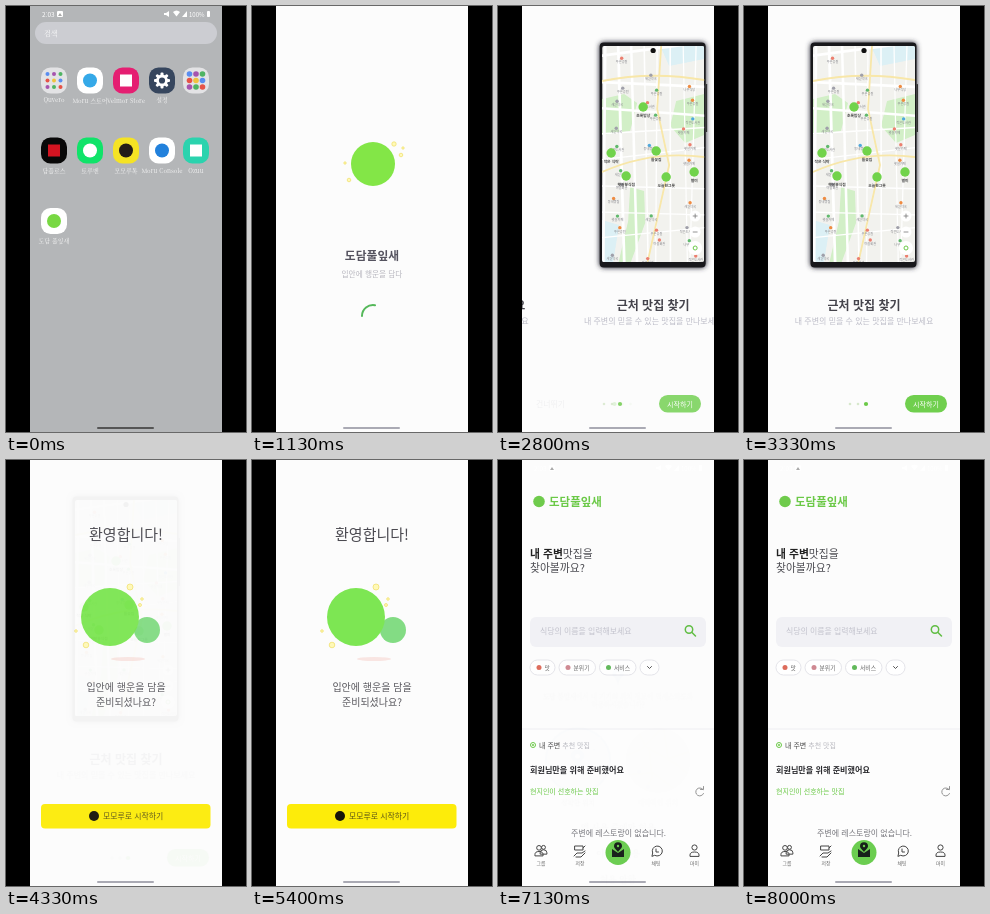
These frames come from a looping animation (240 by 426 pixels, 8070 ms). An HTML page:

```html
<!DOCTYPE html>
<html lang="ko">
<head>
<meta charset="utf-8">
<style>
  html, body { margin: 0; width: 100%; height: 100%; overflow: hidden; background: #000; }
  svg { display: block; width: 100vw; height: 100vh; }
  text { font-family: "Noto Sans CJK KR", "Noto Sans CJK", "Noto Sans", sans-serif; }
  .serif { font-family: "Noto Serif CJK KR", "Noto Serif", "Noto Sans CJK KR", serif; }
</style>
</head>
<body>
<svg id="stage" viewBox="0 0 240 426" xmlns="http://www.w3.org/2000/svg"></svg>
<script>
const LOOP = 8070;
const GREEN = '#6bc947', BLUE = '#1a6fd4', PAPER = '#fcfcfc';

// Drawing helpers
const text = (x, y, size, fill, str, { anchor = 'start', weight = 400, cls = '' } = {}) =>
  `<text x="${x}" y="${y}" font-size="${size}" fill="${fill}" text-anchor="${anchor}" font-weight="${weight}" class="${cls}">${str}</text>`;
const mid = (x, y, size, fill, str, weight = 400, cls = '') =>
  text(x, y, size, fill, str, { anchor: 'middle', weight, cls });
const rect = (x, y, w, h, fill, r = 0, extra = '') =>
  `<rect x="${x}" y="${y}" width="${w}" height="${h}" rx="${r}" fill="${fill}" ${extra}/>`;
const dot = (x, y, r, fill, extra = '') => `<circle cx="${x}" cy="${y}" r="${r}" fill="${fill}" ${extra}/>`;
const line = (d, stroke, width = 1, extra = '') =>
  `<path d="${d}" fill="none" stroke="${stroke}" stroke-width="${width}" stroke-linecap="round" stroke-linejoin="round" ${extra}/>`;
const shape = (d, fill) => `<path d="${d}" fill="${fill}"/>`;
const group = (id, body, extra = '') => `<g id="${id}" ${extra}>${body}</g>`;
const page = fill => rect(24, 0, 192, 426, fill);
const gesture = color => rect(91, 421, 57, 2, color, 1);
const pin = (x, y, s, hole = '#fff') => `<g transform="translate(${x} ${y}) scale(${s})">` +
  shape('M0 8C-2-0.5-6 0-6-3A6 6 0 0 1 6-3C6 0 2-0.5 0 8Z', BLUE) + dot(0, -3, 2.2, hole) + '</g>';
const sparkles = points => points.map(([x, y, r]) =>
  dot(x, y, r, '#fff9b8', 'stroke="#f0df64" stroke-width=".7"')).join('');

function seeded(seed) {
  return () => (seed = (seed * 16807) % 2147483647) / 2147483647;
}

function statusBar() {
  return text(36, 10.5, 6.5, '#fff', '2:03') +
    rect(51, 5, 6, 6, '#fff', 1) + shape('M52 10l2-3 2 3z', '#aaa') +
    shape('M158 7h2l3-2v6l-3-2h-2z', '#fff') +
    shape('M167 6q3.500-3 7 0l-3.500 4.500z', '#fff') + shape('M176 11l5-6v6z', '#fff') +
    text(183, 10.500, 6, '#fff', '100%') + rect(201, 5, 3, 6, '#fff', .8);
}

function homeScreen() {
  const cols = [48, 84, 120, 156, 190];
  const tile = (x, y, fill) => rect(x - 13, y - 13, 26, 26, fill, 9.500);
  const label = (x, y, str) => mid(x, y + 22, 6, '#f6f6f6', str, 400, 'serif');
  const colors = ['#e65347', '#5a8df0', '#4fb463', '#f0c23f', '#a654ae'];
  const folder = (x, y, r) => tile(x, y, '#e3e3e5') + Array.from({ length: 9 }, (_, i) =>
    dot(x - 6.5 + (i % 3) * 6.5, y - 6.5 + Math.floor(i / 3) * 6.5, r, colors[(i * 3 + 1) % 5])).join('');
  const app = (col, y, fill, mark, name, square) => {
    const x = cols[col];
    return tile(x, y, fill) + (square ? rect(x - 6, y - 6, 12, 12, mark) : dot(x, y, 7, mark)) + label(x, y, name);
  };
  const gear = Array.from({ length: 8 }, (_, i) =>
    rect(154.5, 66.5, 3, 4, '#fff', 1, `transform="rotate(${i * 45} 156 74.5)"`)).join('') +
    dot(156, 74.5, 4.5, 'none', 'stroke="#fff" stroke-width="2.800"');
  return page('#b4b6b8') + statusBar() + rect(29, 16, 182, 22, '#cccdd2', 11) +
    text(38, 29.500, 7, '#fff', '검색', { cls: 'serif' }) +
    folder(48, 74.5, 2) + label(48, 74, 'Quvero') +
    app(1, 74.5, '#fff', '#35a9e8', 'Moru 스토어') +
    app(2, 74.5, '#e51f72', '#fff', 'Velmor Store', true) +
    tile(156, 74.5, '#36465e') + gear + label(156, 74, '설정') +
    folder(190, 74.5, 2.8) +
    app(0, 144.500, '#080808', '#d41421', '담플로스', true) +
    app(1, 144.500, '#10e369', '#fff', '토루벤') +
    app(2, 144.500, '#f5e324', '#241c18', '모모루톡') +
    app(3, 144.500, '#fff', '#2281dc', 'Moru Console') +
    app(4, 144.500, '#2bd3ae', '#fff', 'Ozuu', true) +
    app(0, 215, '#fff', '#78d843', '도담 풀잎새') + gesture('#555');
}

function splashScreen() {
  return page(PAPER) + dot(121, 158, 22, '#83e647') +
    sparkles([[142, 138, 2.2], [151, 142, 1.2], [149, 149, 1.8], [93, 157, 1.2], [97, 174, 1.8]]) +
    mid(120, 254, 11.8, '#55535f', '도담풀잎새', 700) +
    mid(120, 271, 7.7, '#b8b7bf', '입안에 행운을 담다', 300) +
    group('spinner', line('M110 310A11 11 0 0 1 123 299.200', '#55b85a', 2)) + gesture('#aaaab4');
}

function phone(content) {
  return rect(66, 36, 107, 226, '#33323c', 5, 'filter="url(#shadow)"') +
    rect(66.5, 36.5, 106, 225, '#18181b', 4) + rect(172.5, 78, 1.5, 48, '#333', .5) +
    `<g clip-path="url(#glass)">${content}</g>` + dot(120, 44.5, 2.600, '#111');
}

const caption = (title, sub, subSize) =>
  mid(120, 304, 12, '#44434b', title, 700) + mid(120, 317.5, subSize, '#bdbdc8', sub, 300);

function timePicker() {
  return rect(69, 40, 102, 216, '#737374') +
    mid(120, 56, 8, '#38383c', '이게 뭐예요?', 700) + text(73, 55, 6, '#444', '‹') +
    [[86, 88], [121, 88], [151, 88]].map(([x, y]) => dot(x, y, 2, '#666')).join('') +
    rect(69, 217, 102, 18, '#777778') + text(73, 226, 4, '#555', '오늘의 식사 시간을 골라요') +
    rect(69, 236, 102, 20, '#69696b') +
    rect(72, 96, 95, 116, '#fdfdfd', 5) +
    shape('M72 138V101q0-5 5-5h85q5 0 5 5v37z', '#86c2f7') +
    shape('M99 128Q99 122 103 116Q107 111 111 116Q116 122 116 128Q115 131 107 131Q100 131 99 128Z', '#fff9e9') +
    rect(103.5, 124, 8, 7, '#28302e', 1) + dot(104, 121, .7, '#333') + dot(111, 121, .7, '#333') +
    dot(102, 123, 1, '#f3b8aa') + dot(113, 123, 1, '#f3b8aa') +
    text(109.5, 149, 4, GREEN, '오전', { weight: 700 }) + text(121.5, 149, 4, '#c8c8c8', '오후') +
    mid(119.5, 173, 16, '#96969a', `06:<tspan fill="${GREEN}">10</tspan>`, 700) +
    line('M82 183H158', '#cfeec0', 1.500, 'stroke-dasharray="1 1.800"') +
    line('M82 183H95', GREEN, 1.500) + dot(95.5, 183, 3, GREEN) +
    text(133, 204, 4, GREEN, '취소') + text(151, 204, 4, GREEN, '확인');
}

function cityMap() {
  const rnd = seeded(41);
  const names = ['나무식당', '푸른공원', '햇살카페', '작은도서관', '동네빵집', '마을회관', '새길약국'];
  const tones = ['#ef8c42', '#ec7f6f', '#50a8dc', '#a0a0aa', '#61b96d'];
  let map = rect(69, 40, 102, 216, '#f2f2ee') +
    shape('M69 93l22-5 13 9-7 28-28 4zM143 95l28-7v41l-19 8-15-17zM97 181l14 4 1 32-15 41H85l10-43z', '#d2efc7') +
    shape('M69 214l17 5-6 37H69zM127 40h44v13l-35 7z', '#dcf0f5');
  for (let i = 0; i < 9; i++) {
    const y = 50 + i * 26, x = 72 + i * 13;
    map += line(`M66 ${y}L174 ${y + (rnd() - .6) * 24}M${x} 38L${x + (rnd() - .5) * 18} 260`, '#fff', 1 + rnd() * 1.800);
  }
  map += line('M69 75Q118 65 171 74M128 40L124 103L136 159L114 258M69 166Q118 144 171 151', '#f8e7a9', 1.800);
  for (let row = 0; row < 15; row++) {
    for (let col = 0; col < 3; col++) {
      const x = 78 + col * 36 + rnd() * 13, y = 52 + row * 14 + rnd() * 5;
      if (rnd() < .2) continue;
      const tone = tones[Math.floor(rnd() * tones.length)];
      map += dot(x, y, 1.700, tone) + mid(x, y + 5, 3.200, '#85858b', names[Math.floor(rnd() * names.length)]);
    }
  }
  const spots = [[110, 101, '초록밥상'], [123, 145, '들꽃집'], [78, 147, '작은 식탁'],
    [93, 170, '햇살분식점'], [133, 171, '오늘한그릇'], [161, 166, '별미']];
  map += spots.map(([x, y, name]) => dot(x, y, 4.700, '#71d34b') + mid(x, y + 10, 3.800, '#444', name, 700)).join('');
  return map + [210, 226, 242].map((y, i) => dot(162, y, i === 2 ? 7 : 5.500, '#fff') +
    (i === 2 ? dot(162, y, 2, 'none', `stroke="${GREEN}"`) : line(i ? `M160 ${y}h4` : `M160 ${y}h4M162 ${y - 2}v4`, '#777', .8))).join('');
}

function onboarding() {
  const pager = (start, step, active) => [0, 1, 2].map(i =>
    dot(start + i * step, 398, i === active ? 2.100 : 1.300, i === active ? GREEN : '#d7e8cc')).join('');
  return page(PAPER) +
    group('slideA', phone(timePicker()) + caption('원하는 시간에 만나보세요', '여행 일정을 자유롭게 조율할 수 있어요', 8.4)) +
    group('slideB', phone(cityMap()) + caption('근처 맛집 찾기', '내 주변의 믿을 수 있는 맛집을 만나보세요', 8)) +
    group('footerA', text(38, 401, 7.9, '#b9b9c0', '건너뛰기', { weight: 300 }) + pager(116.5, 8, 0) +
      dot(192, 398, 8, '#e7f8eb') + line('M189.500 398h5m-2-2 2 2-2 2', GREEN)) +
    group('footerB', pager(106, 8, 2) + rect(161, 389, 42, 17.5, '#70cf4e', 8.700) +
      mid(182, 400.500, 7, '#fff', '시작하기', 500)) + gesture('#aaaab4');
}

function welcomeScreen() {
  return page(PAPER) + mid(120, 79.500, 15, '#4b4a51', '환영합니다!', 500) +
    '<ellipse cx="122" cy="199" rx="17" ry="2" fill="#f9e5e2"/>' +
    dot(141, 170, 13, '#83dc84') + dot(104, 157, 29, '#7de653') +
    sparkles([[124, 127, 3], [136, 139, 1.300], [134, 145, 1.500], [70, 171, 1.300], [80, 185, 2.800]]) +
    mid(120, 231, 10, '#58575d', '입안에 행운을 담을', 500) + mid(120, 246, 10, '#58575d', '준비되셨나요?', 500) +
    rect(35, 344, 169.500, 24.5, '#fdec0a', 4) + dot(88, 356, 5, '#16140a') +
    text(97, 359, 7.900, '#5a5317', '모모루로 시작하기') + gesture('#aaaab4');
}

function mainScreen() {
  const chip = (x, w, str, tone) => rect(x, 200, w, 15, '#fff', 7.500, 'stroke="#dedee4" stroke-width=".800"') +
    dot(x + 9, 207.500, 2.500, tone) + text(x + 14.500, 210, 5.800, '#666', str);
  const person = (x, y, s = 1) => dot(x, y - 3.500 * s, 2.600 * s, 'none', 'stroke="#444"') +
    line(`M${x - 4.500 * s} ${y + 5 * s}v-1q0-3 ${4.500 * s}-3t${4.500 * s} 3v1z`, '#444');
  return page(PAPER) + statusBar() + dot(41, 41.500, 5.800, '#6fcb4c') +
    text(51, 46, 11.500, GREEN, '도담풀잎새', { weight: 700 }) +
    text(32, 97.500, 10.800, '#4a4a50', '<tspan font-weight="700" fill="#222">내 주변</tspan>맛집을', { weight: 300 }) +
    text(32, 112, 10.800, '#4a4a50', '찾아볼까요?', { weight: 300 }) +
    rect(32, 157, 176, 30, '#f1f1f5', 6) +
    text(42, 173.500, 7.900, '#c3c3cd', '식당의 이름을 입력해보세요', { weight: 300 }) +
    dot(191, 169.500, 3.700, 'none', 'stroke="#60bd43" stroke-width="1.500"') + line('M194 172.500l3.500 3.500', '#60bd43', 1.500) +
    chip(32, 25, '맛', '#dd6c5c') + chip(61, 36.500, '분위기', '#cf8992') + chip(101.500, 36.500, '서비스', '#62b95b') +
    rect(142, 200, 19, 15, '#fff', 7.500, 'stroke="#dedee4" stroke-width=".800"') + line('M149.500 206.500l2 2 2-2', '#555') +
    rect(24, 269, 192, 157, '#fdfdfd') + line('M24 269H216', '#ededf1') +
    dot(35, 285, 2.500, 'none', `stroke="${GREEN}"`) + dot(35, 285, 1, GREEN) +
    text(41, 288, 7, '#b8b8bf', '<tspan fill="#444">내 주변</tspan> 추천 맛집') +
    text(32, 313, 8.100, '#29292d', '회원님만을 위해 준비했어요', { weight: 700 }) +
    text(32, 334, 7, GREEN, '현지인이 선호하는 맛집') +
    line('M205 329.500a4 4 0 1 0 .5 4M205.500 326.500v3h-3', '#888', .9) +
    text(73, 375.500, 8, '#77777d', '주변에 레스토랑이 없습니다.', { weight: 300 }) +
    person(45.5, 390, .75) + person(41, 391, .9) +
    line('M77 386h8v4h-8zM76 396l3-3h5l3-2M78 397h5l4-4M85 388l2-2', '#444') +
    dot(120, 392.500, 12.500, '#6bcd50') + shape('M114 389l6 4 6-4v8h-12z', '#17201a') +
    shape('M120 392C118 389 116 388.500 116 386A4 3.800 0 0 1 124 386C124 388.500 122 389 120 392Z', '#17201a') + dot(120, 386, 1.200, '#6bcd50') +
    line('M154 396l.7-3A5 5 0 1 1 157 395.500zM158 389v3h2.500', '#444') + person(196.500, 391) +
    [[43, '그룹'], [82, '저장'], [158, '채팅'], [196.500, '마이']].map(([x, s]) => mid(x, 405, 4.800, '#666', s)).join('') +
    gesture('#aaaab4');
}

function permissionDialog() {
  const choice = (y, str) => mid(120, y, 8.600, '#35353a', str, 700, 'serif');
  return rect(29, 167, 182, 243, '#fdfdfd', 14) + pin(120, 187, .95) +
    mid(120, 209, 6.5, '#666', '<tspan font-weight="700" fill="#444">도담 풀잎새</tspan>에서 내 기기의 위치 정보에 액세스하도록', 400, 'serif') +
    mid(120, 217, 6.5, '#666', '허용하시겠습니까?', 400, 'serif') +
    dot(80, 270.500, 32, '#d8e8fa', `stroke="${BLUE}" stroke-width="1.800"`) +
    line('M55 252l20 10 27-14M64 295l12-33 30 22M49 275l20 7', '#e9f3fd', 2) +
    [[69, 260, BLUE], [96, 260, BLUE], [66, 278, '#e3a0a2'], [108, 265, '#e3a0a2']].map(([x, y, c]) => dot(x, y, 1, c)).join('') +
    pin(79.500, 270, 1.150) +
    `<g clip-path="url(#coarse)">${rect(128, 238, 65, 65, '#e9e5e4')}` +
    line('M139 239L148 257L179 275L194 288M128 266L144 259L161 241M151 258L154 288L145 304M166 240L170 269L194 261M128 285L155 283L183 304', '#f6d26c', 1.700) +
    dot(141, 282, 2, '#5673c4') + dot(150, 297, 2, '#5673c4') + '</g>' +
    mid(80, 315, 6.600, '#333', '정확한 위치', 700, 'serif') + mid(160, 315, 6.600, '#777', '대략적인 위치', 400, 'serif') +
    choice(341, '앱 사용 중에만 허용') + choice(367, '이번만 허용') + choice(393, '허용 안함');
}

const stage = document.getElementById('stage');
stage.innerHTML = `<defs>
  <clipPath id="screen">${rect(24, 0, 192, 426, '#fff')}</clipPath>
  <clipPath id="glass">${rect(69, 40, 102, 216, '#fff', 2)}</clipPath>
  <clipPath id="coarse">${dot(160, 270.5, 32, '#fff')}</clipPath>
  <filter id="shadow" x="-20%" y="-10%" width="140%" height="120%"><feGaussianBlur stdDeviation="2.5"/></filter>
</defs>` + rect(0, 0, 240, 426, '#000') +
  `<g clip-path="url(#screen)">` +
  group('home', homeScreen()) + group('splash', splashScreen()) + group('intro', onboarding()) +
  group('welcome', welcomeScreen()) + group('main', mainScreen()) +
  group('scrim', page('#000') + gesture('#aaa')) + group('dialog', permissionDialog()) + '</g>';

const parts = Object.fromEntries([...stage.querySelectorAll('g[id]')].map(g => [g.id, g]));
const ease = (t, from, to) => {
  const p = Math.min(1, Math.max(0, (t - from) / (to - from)));
  return 1 - (1 - p) ** 3;
};
const move = (name, value) => parts[name].setAttribute('transform', value);
const fade = (name, value) => {
  parts[name].setAttribute('opacity', value);
  parts[name].style.display = value > 0 ? '' : 'none';
};

function render(t) {
  const open = ease(t, 620, 860);
  const scale = .14 + .86 * open;
  fade('splash', Math.min(1, open * 2));
  move('splash', `translate(${48 + 72 * open} ${215 - 2 * open}) scale(${scale}) translate(-120 -213)`);
  move('spinner', `rotate(${(t - 1130) * .27} 121 310)`);

  const slide = ease(t, 2680, 2960);
  fade('intro', ease(t, 1700, 1830));
  move('slideA', `translate(${-192 * slide} 0)`);
  move('slideB', `translate(${192 * (1 - slide)} 0)`);
  fade('footerA', 1 - slide);
  fade('footerB', slide);

  fade('welcome', ease(t, 4200, 4400));
  fade('main', ease(t, 5850, 6000));
  const prompt = ease(t, 6030, 6250) * (1 - ease(t, 7000, 7160));
  fade('scrim', .21 * prompt);
  fade('dialog', prompt);
  move('dialog', `translate(0 ${30 * (1 - prompt)})`);
}

const start = performance.now();
function tick() {
  render((performance.now() - start) % LOOP);
  requestAnimationFrame(tick);
}
tick();
</script>
</body>
</html>
```
